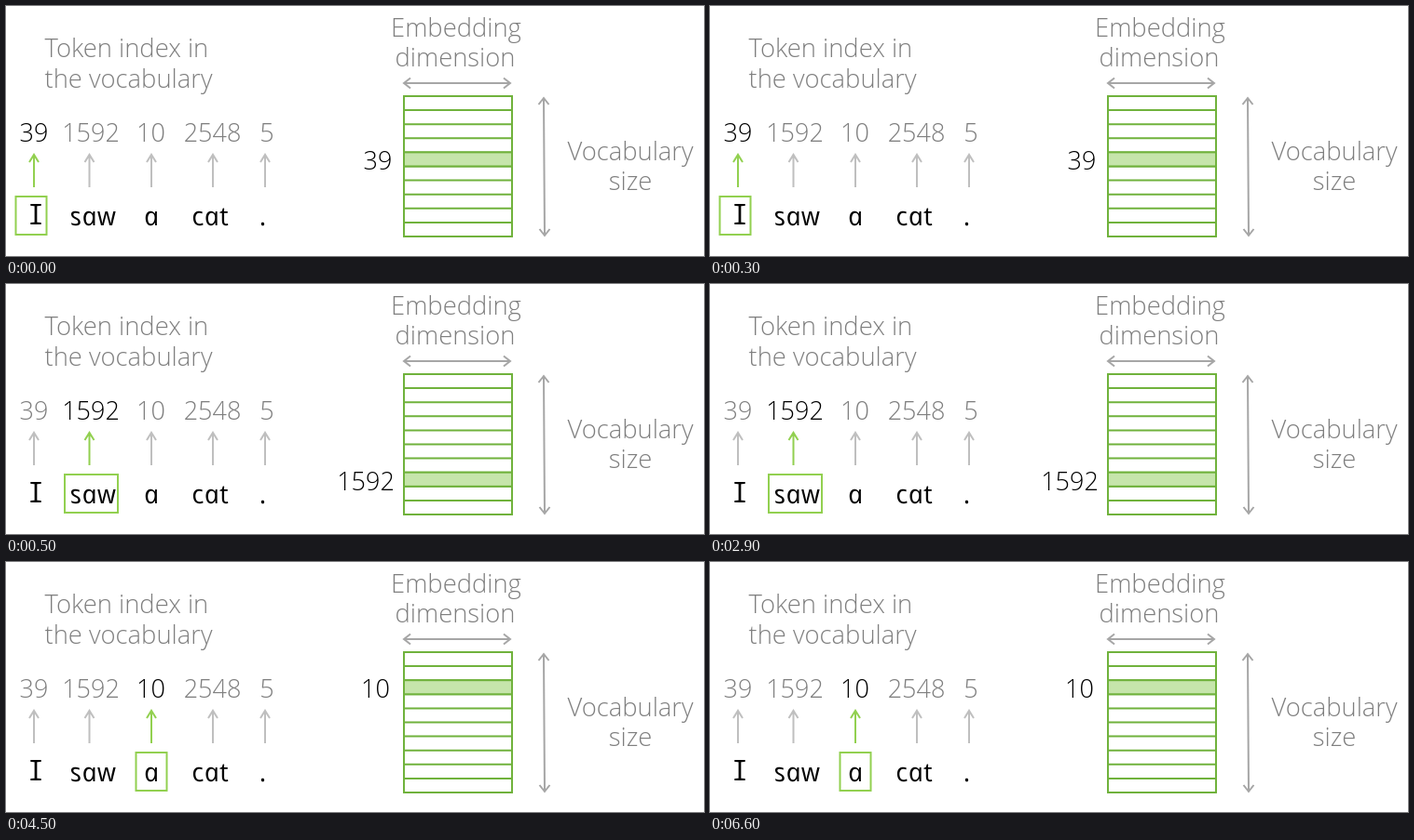
These frames come from a looping animation (749x269 px, 8000 ms). An HTML page:

```html
<!DOCTYPE html>
<html lang="en">
<head>
<meta charset="utf-8">
<title>Token embedding lookup</title>
<style>
  html, body { margin: 0; width: 100%; height: 100%; overflow: hidden; background: #fff; }
  svg { display: block; width: 749px; height: 269px; }
  text { font: 300 27px "Open Sans", "Noto Sans", sans-serif; fill: #7f7f7f; }
  path, rect { fill: none; stroke-width: 2; }
  .caption { font-size: 27.4px; }
  .middle { text-anchor: middle; }
  .axis { stroke: #a6a6a6; }
  .arrow { stroke: #bfbfbf; }
  .table { stroke: #70b23c; }
  .row { stroke: #70b23c; fill: #c6e5ab; }
  .box { stroke: #92d050; }
  .word { font: italic 500 28px "Open Sans", "Noto Sans", sans-serif; letter-spacing: .8px; fill: #000; }
  .serifed { font: 500 30px "Noto Sans Mono", "DejaVu Sans Mono", monospace; }
  .active { fill: #000; }
  .arrow.active { fill: none; stroke: #92d050; }
</style>
</head>
<body>
<svg id="stage" viewBox="0 0 749 269">
  <text class="caption" x="41.5" y="54.7">Token index in</text>
  <text class="caption" x="41.5" y="88">the vocabulary</text>
  <text class="caption middle" x="483" y="33">Embedding</text>
  <text class="caption middle" x="482" y="65">dimension</text>
  <text class="caption middle" x="670" y="165.5">Vocabulary</text>
  <text class="caption middle" x="670" y="198">size</text>
  <path class="axis" d="M427 83H541M434 77.5L427 83L434 88.5M534 77.5L541 83L534 88.5"/>
  <path class="axis" d="M577 99L578 247M571.5 106L577 99L582.5 106M572.5 240L578 247L583.5 240"/>
</svg>
<script>
const stage = document.getElementById("stage");
const ROWS = 10, LEFT = 427, RIGHT = 543, TOP = 97, ROW_HEIGHT = 15.1;
const LOOP = 8000;

const tokens = [
  { word: "I", index: "39", x: 30, wordX: 32.5, indexX: 30 },
  { word: "saw", index: "1592", x: 89.5, wordX: 95.5, indexX: 91 },
  { word: "a", index: "10", x: 156, wordX: 158, indexX: 155.5 },
  { word: "cat", index: "2548", x: 222, wordX: 221, indexX: 221.5 },
  { word: ".", index: "5", x: 278, wordX: 277.5, indexX: 280 }
];

const steps = [
  { start: 0, token: 0, row: 4, labelX: 399, boxX: 10.5, boxWidth: 33 },
  { start: 500, token: 1, row: 7, labelX: 386, boxX: 63, boxWidth: 57 },
  { start: 4500, token: 2, row: 2, labelX: 396.5, boxX: 139.5, boxWidth: 33 }
];

function set(node, attributes) {
  for (const [name, value] of Object.entries(attributes)) node.setAttribute(name, value);
}

function add(tag, attributes, content = "") {
  const node = document.createElementNS("http://www.w3.org/2000/svg", tag);
  set(node, attributes);
  node.textContent = content;
  return stage.appendChild(node);
}

const bottom = TOP + ROWS * ROW_HEIGHT;
let grid = `M${LEFT} ${TOP}V${bottom}M${RIGHT} ${TOP}V${bottom}`;
for (let i = 0; i <= ROWS; i++) grid += `M${LEFT - 1} ${TOP + i * ROW_HEIGHT}H${RIGHT + 1}`;
add("path", { class: "table", d: grid });
const row = add("rect", { class: "row", x: LEFT, width: RIGHT - LEFT, height: ROW_HEIGHT });
const label = add("text", { class: "middle active" });
const box = add("rect", { class: "box", y: 205, height: 41 });

for (const token of tokens) {
  const { x, word } = token;
  token.number = add("text", { class: "middle", x: token.indexX, y: 146 }, token.index);
  token.arrow = add("path", { class: "arrow", d: `M${x} 195V160M${x - 5} 168L${x} 160L${x + 5} 168` });
  // Italic letterforms set upright give the round handwritten "a".
  const serifed = word === "I";
  add("text", {
    class: serifed ? "middle word serifed" : "middle word",
    transform: `translate(${token.wordX} ${serifed ? 234.5 : 236})` + (serifed ? "" : " skewX(12)")
  }, word);
}

let current;
function show(step) {
  const active = tokens[step.token];
  for (const token of tokens) {
    token.number.classList.toggle("active", token === active);
    token.arrow.classList.toggle("active", token === active);
  }
  const y = TOP + step.row * ROW_HEIGHT;
  set(row, { y });
  set(label, { x: step.labelX, y: y + 18.8 });
  label.textContent = active.index;
  set(box, { x: step.boxX, width: step.boxWidth });
}

const origin = performance.now();
function tick() {
  const time = (performance.now() - origin) % LOOP;
  const step = steps.findLast(s => time >= s.start);
  if (step !== current) show(current = step);
  requestAnimationFrame(tick);
}
tick();
</script>
</body>
</html>
```
